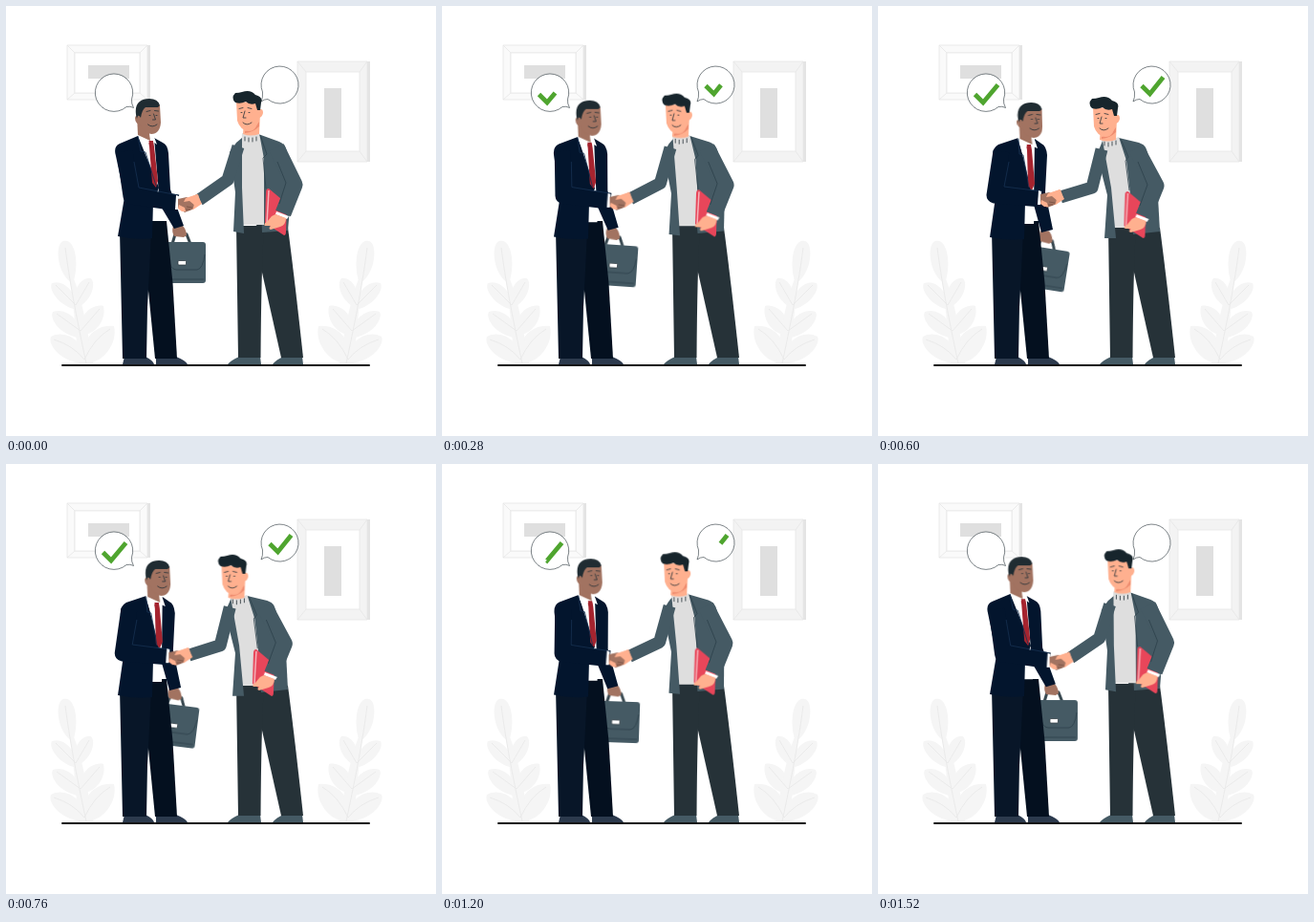
These frames come from a looping animation (450 by 450 pixels, 1.56 s). An HTML page without scripts:

```html
<!DOCTYPE html>
<html lang="en">
<head>
<meta charset="utf-8">
<title>Handshake</title>
<style>
  html, body { margin: 0; height: 100%; overflow: hidden; background: #fff; }
  svg { display: block; width: 100vw; height: 100vh; }

  /* Each moving part names its leaning pose in --to. */
  .morph, .shift, .sway { animation: 1560ms ease-in-out infinite; }
  .morph { animation-name: morph; }
  .shift { animation-name: shift; }
  .sway { animation-name: sway; transform-origin: 181px 236px; }
  @keyframes morph { 38.46% { d: var(--to); animation-timing-function: cubic-bezier(.5, 0, .75, .75); } }
  @keyframes shift { 38.46% { transform: var(--to); animation-timing-function: cubic-bezier(.5, 0, .75, .75); } }
  @keyframes sway { 38.46% { transform: var(--to); animation-timing-function: cubic-bezier(.3, .3, .6, .95); } }

  .tick { fill: none; stroke: #4fa52f; stroke-width: 4.8; stroke-dasharray: 100 300; stroke-dashoffset: 101; }
  .tick.left { animation: tick-left 1560ms ease-in-out infinite; }
  .tick.right { animation: tick-right 1560ms ease-in-out infinite; }
  @keyframes tick-left { 0%, 5% { stroke-dashoffset: 101; } 26%, 70.5% { stroke-dashoffset: 0; } 87%, 100% { stroke-dashoffset: -101; } }
  @keyframes tick-right { 0%, 5% { stroke-dashoffset: 101; } 26%, 68% { stroke-dashoffset: 0; } 83%, 100% { stroke-dashoffset: -101; } }

  .frame { stroke: #e6e6e6; stroke-width: .8; }
  .leaf { fill: #f5f5f5; }
  .vein { fill: none; stroke: #e8e8e8; stroke-width: .8; }
  .bubble { fill: #fff; stroke: #263238; stroke-width: .6; stroke-linejoin: round; }
  .navy { fill: #03152d; }
  .slate { fill: #455a64; }
  .dark { fill: #263238; }
  .brown { fill: #a27361; }
  .peach { fill: #ffb08f; }
  .knit { fill: #dedede; }
  .red { fill: #e8465a; }
  .white { fill: #fff; }
  .sleeve { fill: none; stroke-linejoin: round; stroke-linecap: butt; }
  .line { fill: none; stroke: #263238; stroke-width: .8; stroke-linecap: round; }
  .seam { fill: none; stroke: #2c414b; stroke-width: .8; }
</style>
</head>
<body>
<svg viewBox="0 0 450 450">
  <defs>
    <g id="plant">
      <g class="leaf">
        <path d="M70 290C54 283 50 249 60 246C73 242 77 272 70 290Z"/>
        <path d="M75 318C56 315 44 297 48 290C60 286 73 298 75 318Z"/>
        <path d="M74 316C66 299 80 282 89 285C95 292 88 310 74 316Z"/>
        <path d="M80 348C57 345 45 328 49 320C62 315 79 328 80 348Z"/>
        <path d="M79 345C73 326 89 311 102 314C105 328 95 343 79 345Z"/>
        <path d="M83 374C58 374 43 354 47 346C61 338 84 350 83 374Z"/>
        <path d="M84 374C75 350 94 332 113 335C117 352 103 373 84 374Z"/>
        <path d="M66 283C71 310 73 345 76 374L91 374C87 350 81 310 70 283Z"/>
      </g>
      <path class="vein" d="M62 253Q68 300 84 374M52 292L73 313L87 289M53 322L78 340L98 317M50 349Q70 355 82 370Q92 348 109 338"/>
    </g>
  </defs>

  <!-- wall and floor -->
  <path d="M148 41h3v57h-3zM378 58h3v105h-3z" fill="#e4e4e4"/>
  <path class="frame" d="M64 41h84v57H64zM72 49h68v42H72zM64 41l8 8M148 41l-8 8M64 98l8-7M148 98l-8-7" fill="#fafafa"/>
  <path class="frame" d="M305 58h73v105h-73zM305 58l9 11M378 58l-8 11M305 163l9-11M378 163l-8-11" fill="#f3f3f3"/>
  <path class="frame" d="M72 49h68v42H72zM314 69h56v83h-56z" fill="#fff"/>
  <path d="M86 62h43v14H86zM333 86h18v52h-18z" fill="#dfdfdf"/>
  <use href="#plant"/>
  <use href="#plant" transform="matrix(-1 0 0 1 440 0)"/>
  <path d="M59 376H380" stroke="#111" stroke-width="2" stroke-linecap="round"/>

  <!-- speech bubbles -->
  <path class="bubble" d="M131.500 97.500A19.700 19.700 0 1 0 126 105.500Q130 104.500 133.500 106.500Q131 102 131.500 97.500Z"/>
  <path class="bubble" d="M268.500 90A19.500 19.500 0 1 1 274 97.500Q270 97.500 267 100Q269 96 268.500 90Z"/>
  <path class="tick left" pathLength="100" d="M101.500 92.500L110 101L125.500 82.500"/>
  <path class="tick right" pathLength="100" d="M276 83.500L284.500 92L298.500 74.500"/>

  <!-- man with briefcase -->
  <g class="sway" style="--to:translate(-6px,6px) rotate(9deg)">
    <path d="M174 249L177 239H189L193 249" fill="none" stroke="#37474f" stroke-width="3"/>
    <rect class="slate" x="166" y="247" width="43" height="43" rx="3"/>
    <path class="seam" d="M169 262Q172 276 178 276H200Q206 275 208 260M171 286H207"/>
    <rect class="white" x="180" y="266.500" width="8.500" height="4.500" rx="1" stroke="#263238" stroke-width=".7"/>
    <path class="brown" d="M175 230L184 229Q189 234 189 240L186 242L176 241Q173 236 175 230Z"/>
  </g>
  <path d="M122 375Q123 371 124 367H146Q154 371 155 375ZM157 375L157 367H178Q188 371 190 375Z" fill="#2c3a4d"/>
  <path d="M143 225L168 225Q172 265 174.500 290L179 369H156L148 288Z" fill="#04101f"/>
  <path d="M119 235H152Q150 280 148 315L147 369H122Z" fill="#081628"/>

  <path class="white morph" d="M136 135L156 138L162 188L162 225L151 225Z" style="--to:path('M145 138L166 140L165 188L163 228L151 228Z')"/>
  <path class="navy morph" d="M155 138L164 143Q169 145 170 154L172 192L186 230L176 233L161 208Z"
        style="--to:path('M164 139L171 144Q176 146 177 156L175 195L183 234L171 237L163 208Z')"/>
  <path class="navy morph" d="M138 136L119 144Q112 147 115 157L124 200L117 241Q136 245 153 243L154 205L160 190Z"
        style="--to:path('M147 138L126 145Q120 148 120 157L123 200L117 242Q136 246 153 244L154 205L160 192Z')"/>
  <path class="morph" d="M149 141L154 141L155 147L159 183L157 190L153 185L150 147Z" fill="#a5242f"
        style="--to:path('M155 145L160 145L161 151L164 186L161 193L157 188L156 151Z')"/>
  <path class="white morph" d="M137 134L147 139L150 142L145 149ZM154 142L155 137L158 145Z"
        style="--to:path('M146 138L154 143L156 146L151 154ZM160 146L164 140L167 149Z')"/>
  <path class="morph" d="M138 136L141 152L146 153L157 188" fill="none" stroke="#173152" stroke-width=".8"
        style="--to:path('M147 139L148 155L152 156L158 190')"/>
  <path class="sleeve morph" d="M124 152L131 199L180 206" stroke="#03152d" stroke-width="17"
        style="--to:path('M129 152L122 198L172 202')"/>
  <path class="morph" d="M134 163L139 190L180 198" fill="none" stroke="#173152" stroke-width=".8"
        style="--to:path('M137 163L132 189L172 194')"/>

  <g class="shift" style="--to:translate(10.500px,4px)">
    <path class="brown" d="M137 114L149 126L151 141L138 135Z"/>
    <path class="brown" d="M138 106Q148 98 161 104L162 122Q161 134 152 134Q144 133 141 125Q135 123 135 117Q136 113 139 115Z"/>
    <path d="M137 118C133 104 139 97 150 97Q159 97 161 104L159 106L146 106Q142 109 141 117Q138 112 137 118Z" fill="#202c32"/>
    <path class="line" d="M147 110.500l4-1M155.500 109.500l4 .5M150 114.500h1M157 114.500h1M154.500 113l2 6h-3M148.500 124Q153 128 158 124"/>
  </g>

  <!-- man with book -->
  <path class="slate" d="M232 375Q235 371 244 367H266L267 375ZM279 375Q283 370 290 367H310L311 375Z"/>
  <path class="dark" d="M262 228L295 232Q302 285 311 368H288L266 270Z"/>
  <path class="dark" d="M241 230H270Q267 280 266.500 368H243Z"/>

  <path class="slate morph" d="M264 134L286 142Q292 144 294 152L298 200L295 235L268 237Z"
        style="--to:path('M252 138L273 143Q280 145 282 153L293 200L295 236L267 239Z')"/>
  <path class="knit morph" d="M247 133Q256 136 265 133L270 160L270 229L246 229L246 150Z"
        style="--to:path('M234 138Q243 141 252 137L260 162L268 232L246 232L236 152Z')"/>
  <path class="slate morph" d="M247 138L241 143L234 153L240 195L238 236L249 238L247 190Z"
        style="--to:path('M235 141L233 146L229 155L240 198L237 243L249 243L244 190Z')"/>
  <path class="sleeve morph" d="M243 147L232 182L202 203" stroke="#455a64" stroke-width="13"
        style="--to:path('M234 150L224 190L191 200')"/>
  <path class="line morph" d="M250 137v4M254 138v4M258 138v4M262 137v4" style="--to:path('M237 142v4M241 143v4M245 142v4M249 141v4')"/>
  <path class="seam morph" d="M266 135L273 155L269 159L272 191" style="--to:path('M254 139L262 158L259 162L263 193')"/>

  <g class="shift" style="--to:translate(-13.500px,3px)">
    <path class="red" d="M275 191Q272 191 272 195L271 227L291 240Q293 240 293 236L294 207Z"/>
    <path d="M275 193L273 227" fill="none" stroke="#f6b3ba" stroke-width="1.500"/>
  </g>
  <path class="sleeve morph" d="M283 148L302 187L290 217" stroke="#455a64" stroke-width="17"
        style="--to:path('M270 149L291 188L278 220')"/>
  <path class="seam morph" d="M284 163L293 185L286 207" style="--to:path('M272 163L282 187L274 209')"/>
  <g class="shift" style="--to:translate(-12.500px,3px)">
    <path class="white" d="M283 215L296 220L294 223L282 218Z"/>
    <path class="peach" d="M282 218L293 222Q293 229 287 231L277 234Q274 233 277 230L271 230Q269 228 273 226L278 220Z"/>
  </g>

  <g class="shift" style="--to:translate(-16px,6px)">
    <path class="peach" d="M249 120L266 112L265 134Q256 137 248 134Z"/>
    <path d="M250 131Q260 130 265 121L265 126Q259 132 250 133Z" fill="#ef8d70"/>
    <path class="peach" d="M241 100L264 101L264 109Q269 106 269 112Q268 117 264 117Q263 131 254 131Q245 130 242 120Z"/>
    <path d="M240 101Q235 96 240 91Q244 91 247 90Q256 87 261 93Q269 95 267 101L266 109L263 109L261 102Q255 104 251 100Q245 103 240 101Z" fill="#17252c"/>
    <path class="line" d="M244 107.500l4-1M253 106.500l4 1M246 111.500h1M254 111.500h1M250 110l-2 7h3M248 122Q252 126 257 122"/>
  </g>

  <!-- handshake -->
  <g class="shift" style="--to:translate(-10px,-5px)">
    <path class="white" d="M178 198L181 199L180 213L177 213Z"/>
    <path class="peach" d="M200 197L205 207L196 213L186 213L183 209L187 202Z"/>
    <path class="brown" d="M180 202L189 200L196 204Q198 208 195 213L187 216L180 211Z"/>
    <path class="peach" d="M201 197L204 206L198 209L192 204L186 205L188 201ZM181 208L187 211L188 215L184 215L180 212Z"/>
    <path d="M189 210l6 1M188 213l5 0" fill="none" stroke="#6d4a3e" stroke-width=".7"/>
  </g>
</svg>
</body>
</html>
```
